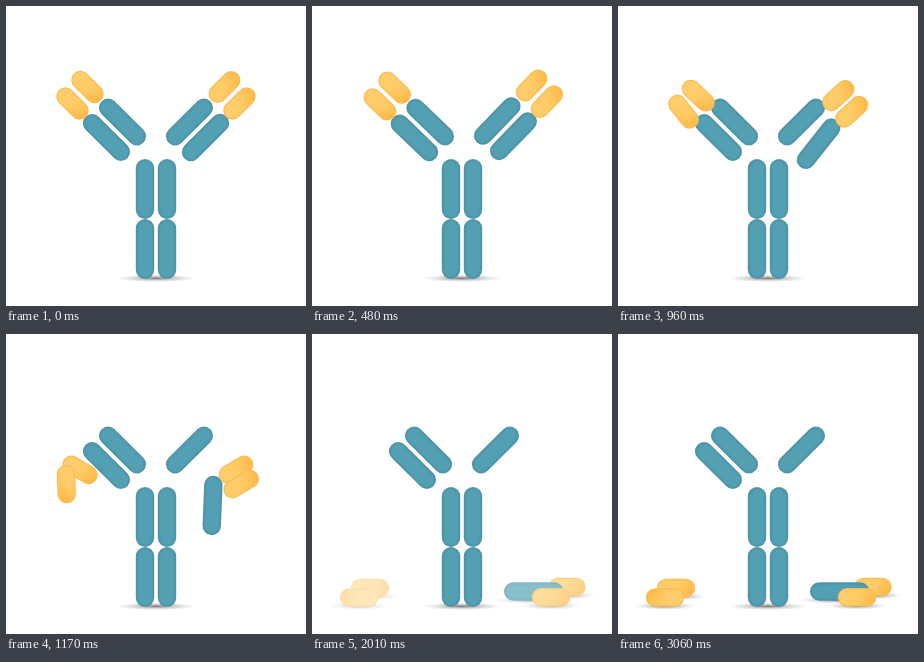
An HTML page that plays this animation: 300 by 300 pixels, repeating every 4.19 s.

```html
<!DOCTYPE html>
<html lang="en">
<head>
<meta charset="utf-8">
<title>Antibody</title>
<style>
html, body { margin: 0; width: 100%; height: 100%; overflow: hidden; background: #fff; }
svg { display: block; width: 100vw; height: 100vh; }
</style>
</head>
<body>
<svg id="stage" viewBox="0 0 300 300">
  <defs>
    <radialGradient id="shade">
      <stop offset="0" stop-color="#222" stop-opacity=".6"/>
      <stop offset=".5" stop-color="#444" stop-opacity=".24"/>
      <stop offset="1" stop-color="#777" stop-opacity="0"/>
    </radialGradient>
    <linearGradient id="gold" gradientUnits="userSpaceOnUse" x1="-14" y1="-7" x2="16" y2="8">
      <stop offset="0" stop-color="#ffcd6c"/>
      <stop offset=".5" stop-color="#ffcb66"/>
      <stop offset="1" stop-color="#fcb845"/>
    </linearGradient>
  </defs>
  <g id="base"></g>
  <g id="arms"></g>
</svg>
<script>
const LOOP = 4190, STEP = 30;
const DROP = 822, LAND = 1440, SETTLED = 1620, FADE = 870, LAG = 150;
const TONES = {
  blue: ['#5093a5', '#4f9aad', '#53a0b4'],
  gold: ['#fabd55', 'url(#gold)']
};
const $ = id => document.getElementById(id);
const clamp = v => Math.max(0, Math.min(1, v));
const mix = (a, b, k) => a.map((v, i) => v + (b[i] - v) * k);
const wave = (t, period) => Math.sin(2 * Math.PI * t / period);

function add(parent, tag, attrs = {}) {
  const el = document.createElementNS('http://www.w3.org/2000/svg', tag);
  for (const k in attrs) el.setAttribute(k, attrs[k]);
  parent.appendChild(el);
  return el;
}

// A capsule centred on its own origin, lying along x
function pill(parent, tone, half) {
  const g = add(parent, 'g');
  TONES[tone].forEach((stroke, i) => add(g, 'path', {
    d: `M${-half} 0H${half}`, stroke,
    'stroke-width': 18.4 - 2.6 * i, 'stroke-linecap': 'round'
  }));
  return g;
}

function place(el, [x, y, a]) {
  el.setAttribute('transform', `translate(${x.toFixed(2)} ${y.toFixed(2)}) rotate(${a.toFixed(2)})`);
}

function shadow(parent, cx, cy, rx) {
  add(parent, 'ellipse', { cx, cy, rx, ry: 3.8, fill: 'url(#shade)' });
}

// Side is -1 for the left arm, 1 for the right
const pose = (side, x, y) => [150 + side * x, y, -45 * side];
const BLUE_IN = [33.5, 116], BLUE_OUT = [49.5, 131.5];
const GOLD_IN = [68.5, 81], GOLD_OUT = [83.5, 97.5];

shadow($('base'), 150, 272.3, 40);
for (const x of [139, 161])
  for (const y of [183, 243]) place(pill($('base'), 'blue', 20.8), [x, y, 90]);

for (const [side, spot] of [[-1, BLUE_OUT], [-1, BLUE_IN], [1, BLUE_IN]])
  place(pill($('arms'), 'blue', 20.3), pose(side, ...spot));

// A heap holds the pieces that break off one arm, back to front
function heap(delay, parts) {
  const group = add($('arms'), 'g');
  const floor = add(group, 'g');
  const pieces = parts.map(([tone, half, from, to]) => {
    shadow(floor, to[0], to[1] + 8.5, half + 20);
    return { el: pill(group, tone, half), from, to };
  });
  return { delay, group, floor, pieces };
}

const [bx, by, ba] = pose(1, ...BLUE_OUT);
const heaps = [
  heap(0, [
    ['gold', 10, pose(-1, ...GOLD_IN), [58, 254, 0]],
    ['gold', 10, pose(-1, ...GOLD_OUT), [47, 263.5, 180]]
  ]),
  heap(LAG, [
    ['blue', 20.5, [bx, by, ba + 180], [221.7, 257.5, 0]],
    ['gold', 9.5, pose(1, ...GOLD_IN), [255, 253, 0]],
    ['gold', 10, pose(1, ...GOLD_OUT), [239, 263.3, 0]]
  ])
];
const [bar, rear, front] = heaps[1].pieces.map(p => p.el);

function rattle(t) {
  const k = clamp((DROP + 48 - t) / 60);
  const dx = 2.8 * k * wave(t, 116.4);
  const dy = 1.5 * k * wave(t, 188.4);
  const turn = -2 * k * wave(t, 230.8);
  return `translate(${dx} ${dy}) rotate(${turn} 150 130)`;
}

function draw(t) {
  // Gravity: distance fallen grows with the square of time
  const fall = clamp((t - DROP) / (LAND - DROP)) ** 2;
  $('arms').setAttribute('transform', rattle(t));
  for (const { delay, group, floor, pieces } of heaps) {
    for (const p of pieces) place(p.el, mix(p.from, p.to, fall));
    const k = clamp((t - SETTLED - delay) / FADE);
    group.setAttribute('opacity', 1 - .55 * Math.sin(Math.PI * k) ** 2);
    floor.setAttribute('opacity', clamp((t - LAND) / (SETTLED - LAND)));
  }
  // Once down, the blue bar lies in front of the rear piece
  heaps[1].group.insertBefore(bar, fall < 1 ? rear : front);
}

const begin = performance.now();
function tick() {
  const t = (performance.now() - begin) % LOOP;
  draw(Math.floor(t / STEP) * STEP);
  requestAnimationFrame(tick);
}
tick();
</script>
</body>
</html>
```
